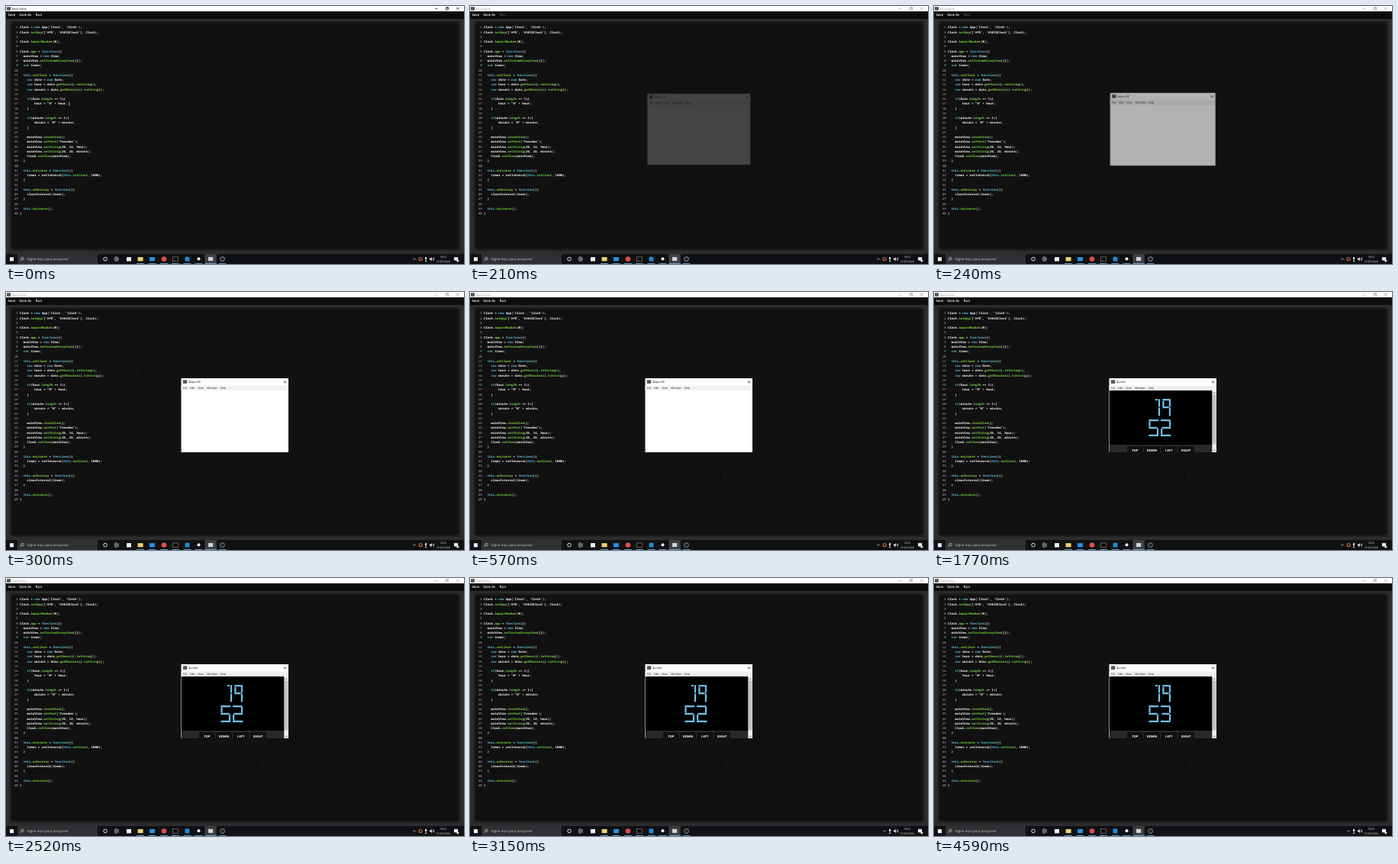
Write an HTML page that moves like this. It is 600 px wide and 338 px high and loops after 4620 ms.

```html
<!DOCTYPE html>
<html lang="en">
<head>
<meta charset="utf-8">
<title>Editor</title>
<style>
html, body { margin: 0; width: 100%; height: 100%; overflow: hidden; background: #111; }
svg { display: block; width: 600px; height: 338px; }
text { font-family: "Open Sans", sans-serif; text-rendering: geometricPrecision; white-space: pre; }
#code text { font: 600 4px "Noto Sans Mono", monospace; fill: #f4f4f0; }
#code .num { font-weight: 400; fill: #c4c4c0; }
#code .key { fill: #55bdd6; }
#code .fn { fill: #78cf3c; }
.mid { text-anchor: middle; }
.line { fill: none; stroke-width: .7; }
.led { fill: none; stroke: #74bfe8; }

/* one 4620 ms loop for every part */
.a { animation: 4620ms step-end infinite; }
.caret { animation-name: caret; }
.title { animation-name: title; }
.run { animation-name: run; }
.blank { animation-name: blank; }
.runner { animation-name: runner; }
.splash { animation-name: splash; }
.clock { animation-name: clock; }
.before { animation-name: before; }
.after { animation-name: after; }
.orange { animation-name: orange; }
.chevron { animation-name: chevron; }
.mouse { animation-name: mouse; animation-timing-function: ease-in-out; }
.popup { animation-name: popup; animation-timing-function: ease-out; transform-origin: 299.7px 161.5px; }
@keyframes caret { 0% { opacity: 1 } 3.4%, 100% { opacity: 0 } }
@keyframes title { 0% { fill: #111; stroke: #111 } 4.5%, 100% { fill: #999; stroke: #999 } }
@keyframes run { 0% { opacity: 1 } 2.5% { opacity: .35 } 6.2%, 100% { opacity: 1 } }
@keyframes blank { 0% { opacity: 1 } 13.6%, 100% { opacity: 0 } }
@keyframes runner { 0% { opacity: 0 } 13.6%, 100% { opacity: 1 } }
@keyframes splash { 0% { opacity: 1 } 30.2%, 100% { opacity: 0 } }
@keyframes clock { 0% { opacity: 0 } 30.2%, 100% { opacity: 1 } }
@keyframes before { 0% { opacity: 1 } 94.78%, 100% { opacity: 0 } }
@keyframes after { 0% { opacity: 0 } 94.78%, 100% { opacity: 1 } }
@keyframes orange { 0% { opacity: 1 } 63.6%, 100% { opacity: 0 } }
@keyframes chevron { 0% { transform: none } 63.6%, 100% { transform: translateX(8px) } }
@keyframes mouse {
  0% { transform: translate(133px, 116px) }
  3%, 4.4% { transform: translate(43px, 12px) }
  6.49% { transform: translate(178px, 104px) }
  12.4%, 100% { transform: translate(329px, 240px) }
}
@keyframes popup {
  0%, 4.4% { opacity: 0; transform: scale(.95) }
  5.19% { opacity: .67; transform: scale(.982) }
  6.45%, 100% { opacity: 1; transform: none }
}
</style>
</head>
<body>
<svg viewBox="0 0 600 338">
  <defs>
    <filter id="soft" x="-5%" y="-5%" width="110%" height="110%"><feGaussianBlur stdDeviation="1.6"/></filter>
  </defs>

  <!-- editor window -->
  <rect width="600" height="338" fill="#2d2d2e"/>
  <rect width="600" height="7" fill="#fff"/>
  <rect x="1" y="1.2" width="5" height="4.6" fill="#555"/>
  <g class="a title">
    <text x="7.3" y="4.8" font-size="3.55" stroke="none">Zelpo Editor</text>
    <path class="line" stroke-width=".6" d="M562 3.3h3.4M576.2 2.4h2.6v2.6h-2.6zM577 2.4v-.8h2.6v2.6h-.8M590.2 1.7l3 3m0-3l-3 3"/>
  </g>
  <rect y="7" width="600" height="10" fill="#0c0c0d"/>
  <g fill="#fff" font-size="4.4" font-weight="600">
    <text x="2.4" y="13.4">Save</text>
    <text x="17.2" y="13.4">Save As</text>
    <text class="a run" x="38.8" y="13.4">Run</text>
  </g>
  <rect x="6.5" y="21.5" width="587" height="297.5" fill="#0a0a0a" filter="url(#soft)"/>
  <rect x="8" y="23" width="584" height="294.5" fill="#111112"/>
  <g id="code"></g>
  <rect class="a caret" x="82.6" y="125.4" width=".7" height="5.2" fill="#e8e8e0"/>
  <path class="a mouse line" stroke="#000" d="M-1.2-2.6h2.4M0-2.6v5.2M-1.2 2.6h2.4"/>

  <!-- taskbar -->
  <rect y="325" width="600" height="13" fill="#101114"/>
  <rect x="15" y="325" width="105" height="13" fill="#2f3033"/>
  <rect x="5" y="329.2" width="5" height="5" fill="#fff"/>
  <g class="line" stroke="#ddd">
    <circle cx="21.5" cy="330.8" r="1.7"/><path d="M20.3 332l-1.9 1.9"/>
    <circle cx="130" cy="331.5" r="2.3" stroke-width="1"/>
    <path d="M142.6 330.2h3v2.6h-3zM142.6 328.9h3M142.6 334.1h3M147 329v5"/>
  </g>
  <text x="27.5" y="333.1" font-size="4.46" fill="#c4c4c4">Digite aqui para pesquisar</text>
  <rect x="260.5" y="325" width="15.3" height="13" fill="#3c3e42"/>
  <rect x="158" y="329" width="6" height="5.4" fill="#f2f2f2"/>
  <rect x="172.6" y="329" width="7" height="5.2" fill="#f4cf66"/>
  <rect x="188" y="329" width="7" height="5.2" fill="#2a8fe0"/>
  <circle cx="207" cy="331.5" r="3.3" fill="#dc5144"/>
  <rect x="218.6" y="328.9" width="7" height="5.2" fill="#060606" stroke="#bbb" stroke-width=".5"/>
  <rect x="234.6" y="328.6" width="5.8" height="5.8" fill="#2489d0"/>
  <circle cx="252.5" cy="331.3" r="2" fill="#f0f0f0"/>
  <rect x="265" y="328.9" width="6.2" height="5" fill="#d4d4d4"/>
  <circle cx="283.5" cy="331.5" r="3" fill="#24252a" stroke="#c8c8c8" stroke-width=".6"/>
  <path stroke="#76b9ed" stroke-width=".8" d="M171 337.5h10M186.5 337.5h10M202 337.5h10M217 337.5h10M232.5 337.5h10M247.5 337.5h10M260.5 337.5h15.3M278.5 337.5h10"/>

  <!-- tray -->
  <path class="a chevron line" stroke="#eee" d="M533.2 332.5l1.8-1.8 1.8 1.8"/>
  <circle class="a orange" cx="543" cy="331.5" r="2" fill="none" stroke="#d8663c" stroke-width="1.1"/>
  <rect x="549.1" y="328.8" width="2" height="3.6" rx="1" fill="#eee"/>
  <path class="line" stroke="#eee" d="M550.1 333v1.5M548.8 334.5h2.6M559 330.2q1 1.3 0 2.6M560.1 329.4q1.6 2.1 0 4.2"/>
  <path fill="#eee" d="M555 330.6h1.2l1.6-1.6v5l-1.6-1.6H555z"/>
  <g class="mid" fill="#f2f2f2" font-size="3.4">
    <text class="a before" x="572.6" y="330.3">19:52</text>
    <text class="a after" x="572.6" y="330.3">19:53</text>
    <text x="572.6" y="336">27/07/2020</text>
  </g>
  <path fill="#f2f2f2" d="M587 329h5v4h-2.2l-1.2 1.4v-1.4H587z"/>
  <circle cx="591.8" cy="333.8" r="1.6" fill="#ddd"/>

  <!-- popup -->
  <g class="a popup">
    <rect x="229.5" y="113" width="140.5" height="97" fill="#fff"/>
    <rect x="232" y="115.3" width="5.2" height="4.6" fill="#555"/>
    <path class="line" stroke="#111" d="M364 116.3l3 3m0-3l-3 3"/>
    <rect x="229.5" y="122.6" width="140.5" height="6.4" fill="#f0f0f0"/>
    <g id="menu" font-size="3.55" fill="#222"></g>
    <text class="a blank" x="239" y="119.3" font-size="3.6">Zelpo IDE</text>
    <g class="a runner">
      <text x="239" y="119.3" font-size="3.6">Runner</text>
      <rect x="230" y="129" width="134.6" height="71" fill="#000"/>
      <rect x="230" y="200" width="134.6" height="10" fill="#29292c"/>
      <g id="pad" class="mid" font-size="4.1" font-weight="700"></g>
      <rect x="364.6" y="129" width="5.4" height="81" fill="#f1f1f1"/>
      <rect x="365" y="134.5" width="4.6" height="65" fill="#c1c1c1"/>
      <path fill="#444" d="M366 132.8l1.3-1.5 1.3 1.5zM366 206.8l1.3 1.5 1.3-1.5z"/>
      <g class="a splash"><g id="word" class="led" stroke-dasharray=".9 .1" transform="translate(263 154.6) scale(2.1)"></g></g>
      <g class="a clock">
        <g class="led" stroke-width="2.2">
          <path d="M290 141.2h3M295 140.2v10.4M295 151.4v10.8"/>
          <path d="M299.4 141.2h8.4M300.4 142.8v7.4M308.9 140.2v10.4M299.4 151.2h8.2M308.9 151.6v10.8"/>
          <path d="M281.4 168.2h12.6M282.5 169.6v7M281.4 177.8h11M293 178.4v8.4M281.4 187.8h12.6"/>
          <path class="a before" d="M297 168.2h12.6M309.1 169.2v7.4M298.4 177.8h11.8M298.1 179v7.6M297 187.8h13.4"/>
          <path class="a after" d="M297 168.2h12M309.1 168.2v8.6M298.4 177.8h10M309.1 178.6v8.6M297 187.8h12.6"/>
        </g>
      </g>
    </g>
  </g>
</svg>
<script>
const source = `Clock = new App('Clock', 'Clock');
Clock.setApp(['#f8', '#1018Clock'], Clock);

Clock.importNumber(0);

Clock.app = function(){
  mainView = new View;
  mainView.setCustomArrayView([]);
  var timer;

  this.setClock = function(){
    var date = new Date;
    var hour = date.getHours().toString();
    var minute = date.getMinutes().toString();

    if(hour.length == 1){
        hour = "0" + hour;
    }

    if(minute.length == 1){
        minute = "0" + minute;
    }

    mainView.cleanView();
    mainView.setFont('Freedom');
    mainView.setString(26, 14, hour);
    mainView.setString(26, 26, minute);
    Clock.setView(mainView);
  }

  this.onCreate = function(){
    timer = setInterval(this.setClock, 1000);
  }

  this.onDestroy = function(){
    clearInterval(timer);
  }

  this.onCreate();
}`;

const fill = (id, items, draw) => {
  document.getElementById(id).innerHTML = items.map(draw).join('');
};

const paint = line => line.replace(/\b(new|var|function|this|if)\b|\.([a-z]\w*)/gi,
  (all, key, fn) => key ? `<tspan class="key">${key}</tspan>` : `.<tspan class="fn">${fn}</tspan>`);

fill('code', source.split('\n'), (line, i) => {
  const y = 29.3 + i * 6.25;
  const x = 18 + line.search(/\S|$/) * 2.4;
  return `<text class="num" x="15.6" y="${y}" text-anchor="end">${i + 1}</text>` +
    `<text x="${x}" y="${y}">${paint(line.trim())}</text>`;
});

fill('menu', [['File', 231.8], ['Edit', 241], ['View', 251.2], ['Window', 263.2], ['Help', 280.6]],
  ([label, x]) => `<text x="${x}" y="127.1">${label}</text>`);

fill('pad', [['TOP', 253], ['DOWN', 275], ['LEFT', 297.3], ['RIGHT', 319.8]], ([label, x]) =>
  `<rect x="${x}" y="202" width="21" height="8" fill="#111113"/>` +
  `<text x="${x + 10.4}" y="209" fill="#fff">${label}</text>`);

// letters of the splash word on a 5 by 8 cell grid
fill('word', [
  'M1 .5h3M.5 1v6M4.5 1v1M4.5 6v1M1 7.5h3',
  'M1 .5h2M2.5 1v6M1 7.5h3',
  'M1 2.5h3M.5 3v4M4.5 3v4M1 7.5h3',
  'M1 2.5h3M.5 3v4M4.5 3v1M4.5 6v1M1 7.5h3',
  'M.5 0v8M4 2.5h1M3 3.5h1M1 4.5h2M3 5.5h1M4.5 6v2'
], (d, i) => `<path d="${d}" transform="translate(${i * 6} 0)"/>`);
</script>
</body>
</html>
```
